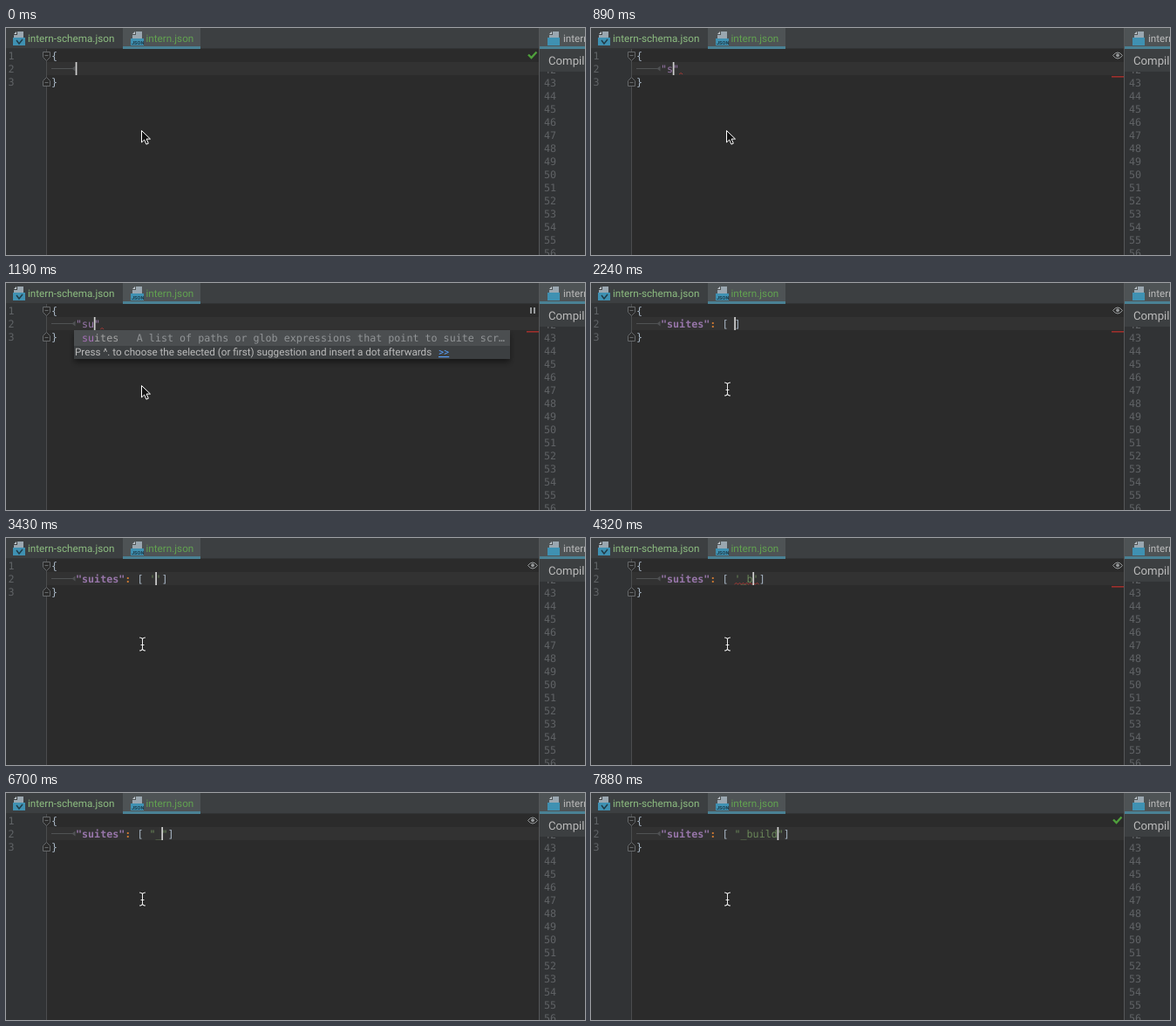
Write an HTML page that moves like this. It is 664 by 260 pixels and loops after 8000 ms.

```html
<!DOCTYPE html>
<html lang="en">
<head>
<meta charset="utf-8">
<title>Schema completion in an editor</title>
<style>
  html, body { margin: 0; width: 100%; height: 100%; overflow: hidden; background: #2b2b2b; }
  svg { display: block; width: 664px; height: 260px; }
  text { white-space: pre; text-rendering: geometricPrecision; }
  .mono { font: 11.7px "DejaVu Sans Mono", "Liberation Mono", monospace; }
  .ui { font: 11.7px Roboto, "Liberation Sans", sans-serif; fill: #bbb; }
  .num { fill: #606366; }
  .code { fill: #a9b7c6; }
  .key { fill: #9876aa; }
  .bold { font-weight: bold; }
  .colon { fill: #cc7832; font-weight: bold; }
  .str { fill: #6a8759; }
  .match { fill: #ffef28; font-weight: bold; }
  .name { fill: #a3a3a3; }
  .hit { fill: #a770b8; }
  .desc { fill: #606365; text-anchor: end; }
  .desc.on { fill: #919496; }
  .link { fill: #589df6; text-decoration: underline; }
  .off { display: none; }
</style>
</head>
<body>
<svg viewBox="0 0 664 260">
  <defs>
    <g id="page">
      <path d="M6 0h7v9H2V4h4z" fill="#9aa7b0"/>
      <path d="M5 0v3H2z" fill="#c3cbd0"/>
    </g>
    <clipPath id="rows"><rect x="78" y="54" width="500" height="81"/></clipPath>
    <filter id="shadow" x="-5%" y="-20%" width="110%" height="150%">
      <feDropShadow dx="0" dy="4" stdDeviation="3" flood-color="#000" flood-opacity=".45"/>
    </filter>
  </defs>

  <!-- Editor -->
  <rect width="664" height="260" fill="#2b2b2b"/>
  <rect y="24" width="46" height="236" fill="#313335"/>
  <rect x="47" y="39" width="564" height="15" fill="#323232"/>
  <path d="M46.5 24V260" stroke="#4b4d4e"/>
  <g fill="#2b2b2b" stroke="#66696b">
    <path d="M42.5 27.5h8v6l-4 4-4-4zM44.500 31.500h4"/>
    <path d="M42.500 66.500h8v-6l-4-4-4 4zM44.500 62.500h4"/>
  </g>
  <g class="mono num">
    <text x="2.500" y="36">1</text>
    <text x="2.500" y="51">2</text>
    <text x="2.500" y="66">3</text>
  </g>
  <path d="M52 46.500H76" stroke="#505254"/>
  <path d="M79.500 43.500v6l-4-3z" fill="#505254"/>
  <text class="mono code" x="52" y="36">{</text>
  <text class="mono code" x="52" y="66">}</text>

  <!-- Typed line -->
  <g id="marks" fill="#3b514d"></g>
  <text id="line" class="mono code" x="80" y="51"></text>
  <path id="wave" fill="none" stroke="#b03a36" stroke-width=".9"/>
  <rect id="caret" y="39" width="1.700" height="15" fill="#d0d0d0"/>

  <!-- Inspection status -->
  <rect id="stripe" x="597" y="55" width="14" height="1.600" fill="#9e2f2c"/>
  <g id="icons">
    <path id="ok" d="M599 30.500l3.500 3.500 6-6.500" fill="none" stroke="#4f9f3c" stroke-width="2.400"/>
    <g id="eye" fill="none" stroke="#989b9d">
      <path d="M598.500 31.500q5.500-7 11 0q-5.500 7-11 0z"/>
      <circle cx="604" cy="31.300" r="1.500" fill="#989b9d"/>
    </g>
    <path id="wait" d="M601 28h2v7h-2zM605 28h2v7h-2z" fill="#989b9d"/>
    <g id="bad">
      <circle cx="604" cy="31.500" r="4.800" fill="#b5403c"/>
      <path d="M604 28.500v3.500M604 33v1.500" stroke="#eee" stroke-width="1.300"/>
    </g>
  </g>

  <!-- Tabs -->
  <rect width="664" height="24" fill="#3c3f41"/>
  <path d="M0 23.500H611" stroke="#323435"/>
  <rect x="134" width="89" height="24" fill="#4e5355"/>
  <rect x="134" y="21" width="89" height="3" fill="#4a8194"/>
  <use href="#page" x="7" y="4"/>
  <rect x="8" y="11" width="14" height="9" fill="#3f91b2"/>
  <path d="M12 14l3 4 4-5" fill="none" stroke="#213c48" stroke-width="1.500"/>
  <text class="ui" x="25" y="16" style="fill:#8dbd80">intern-schema.json</text>
  <use href="#page" x="143" y="4"/>
  <rect x="143" y="12" width="15" height="8" fill="#3f91b2"/>
  <text class="ui" x="144" y="18.500" style="fill:#1d3a48;font-size:5.600px;font-weight:bold">JSON</text>
  <text class="ui" x="160.500" y="16" style="fill:#62a250">intern.json</text>

  <!-- Right pane -->
  <rect x="612" y="24" width="52" height="236" fill="#313335"/>
  <g id="numbers" class="mono num"></g>
  <rect x="612" width="52" height="24" fill="#4e5355"/>
  <rect x="612" y="21" width="52" height="3" fill="#4a8194"/>
  <use href="#page" x="621" y="4"/>
  <rect x="621" y="11" width="14" height="9" fill="#3f91b2"/>
  <text class="ui" x="639" y="16">intern</text>
  <rect x="612" y="24" width="52" height="26" fill="#3c3f41"/>
  <text class="ui" x="622" y="42" style="font-size:13.200px">Compil</text>
  <path d="M611.500 0V260" stroke="#555759"/>

  <g id="popups"></g>

  <!-- Pointers -->
  <path id="arrow" d="M155.500 117.500v13.500l3.200-3 2.200 5.200 2.400-1-2.200-5.100h4.400z" fill="#111" stroke="#fff"/>
  <g id="beam" fill="none">
    <path d="M153 114q3.500 0 3.500 2.500v10q0 2.500-3.500 2.500M160 114q-3.500 0-3.500 2.500v10q0 2.500 3.500 2.500M154.500 122.500h4" stroke="#111" stroke-width="2.600"/>
    <path d="M153 114q3.500 0 3.500 2.500v10q0 2.500-3.500 2.500M160 114q-3.500 0-3.500 2.500v10q0 2.500 3.500 2.500M154.500 122.500h4" stroke="#eee" stroke-width="1.200"/>
  </g>
</svg>

<script>
const LOOP = 8000, LEFT = 80, CELL = 7.044;
const $ = id => document.getElementById(id);
const show = (el, on) => el.classList.toggle("off", !on);
const span = (cls, s) => `<tspan class="${cls}">${s}</tspan>`;
const text = (cls, x, y, s) => `<text class="${cls}" x="${x}" y="${y}">${s}</text>`;
const rect = (x, y, w, h, fill) => `<rect x="${x}" y="${y}" width="${w}" height="${h}" fill="${fill}"/>`;

// Time, typed line ("|" is the caret), status icon, then flags:
// r error stripe, w wave under the value, k wave after the key,
// h bracket highlight, L long popup, S short popup
const list = value => `"suites": [${value}]`;
const steps = [
  [0, "|", "ok", ""],
  [150, "", "ok", ""],
  [590, '"|"', "eye", ""],
  [890, '"s|"', "eye", "rk"],
  [1040, '"s|"', "eye", "rkL"],
  [1190, '"su|"', "wait", "rkS"],
  [2090, list("|"), "eye", "r"],
  [2240, list(" |"), "eye", "r"],
  [2540, list(' "|"'), "eye", "r"],
  [2690, list(' "|"'), "ok", ""],
  [3130, list(" |"), "eye", "h"],
  [3430, list(" '|'"), "eye", ""],
  [3730, list(" '|'"), "bad", "rw"],
  [4030, list(" '_|'"), "eye", "rw"],
  [4320, list(" '_b|'"), "eye", "rw"],
  [4470, list(" '_b|'"), "bad", "rw"],
  [4620, list(" '_bu|'"), "eye", "rw"],
  [4770, list(" '_bui|'"), "eye", "rw"],
  [4920, list(" '_buil|'"), "eye", "rw"],
  [5210, list(" '_bui|'"), "eye", "rw"],
  [5360, list(" '_bu|'"), "eye", "rw"],
  [5510, list(" '_b|'"), "eye", "rw"],
  [5660, list(" '_|'"), "eye", "rw"],
  [5810, list(" '|'"), "eye", "rw"],
  [5960, list(" |"), "eye", "rh"],
  [6250, list(' "|"'), "eye", "r"],
  [6400, list(' "|"'), "ok", ""],
  [6700, list(' "_|"'), "eye", ""],
  [6990, list(' "_b|"'), "eye", ""],
  [7140, list(' "_b|"'), "ok", ""],
  [7290, list(' "_bu|"'), "eye", ""],
  [7440, list(' "_bui|"'), "eye", ""],
  [7590, list(' "_buil|"'), "eye", ""],
  [7730, list(' "_build|"'), "eye", ""],
  [7880, list(' "_build|"'), "ok", ""]
];

const options = [
  ["suites", "A list of paths or glob expressions that point to suite scr…"],
  ["scripts", "A list of scripts to load before any external loader is co…"],
  ["sessionId", "An identifier for this test session"],
  ["showConfig", "display the resolved config and exit"],
  ["filterErrorStack", "filter external library calls and runtime calls o…"]
];

function popup(id, rows, hit, hintTop) {
  const body = rows.map(([name, desc], i) => {
    const y = 67 + i * 18;
    return text("mono name", 87, y, name.replace(hit, m => span("hit", m))) +
      text("mono desc" + (i ? "" : " on"), 572, y, desc);
  }).join("");
  const y = hintTop + 11;
  return `<g id="${id}"><g filter="url(#shadow)">` +
    rect(78, 54, 500, hintTop - 39, "#3b3e40") + "</g>" +
    rect(78, 54, 500, 18, "#4b4e50") +
    `<g clip-path="url(#rows)">${body}</g>` +
    rect(78, hintTop, 500, 15, "#3c3f41") +
    text("ui", 79, y, "Press ^. to choose the selected (or first) suggestion and insert a dot afterwards") +
    text("ui link", 496, y, "&gt;&gt;") +
    (rows.length > 1 ? `<text class="ui" x="566" y="${y}" style="fill:#589df6;font-size:13px">π</text>` : "") +
    "</g>";
}

$("popups").innerHTML =
  popup("long", options, /^s|S/, 135) + popup("short", options.slice(0, 1), /^su/, 72);
$("numbers").innerHTML = Array.from({ length: 15 }, (_, i) =>
  text("", 617, 52 + i * 15, 42 + i)).join("");

function paint(line, flags) {
  const bracket = flags.includes("h") ? "match" : "code";
  return line.replace(/"suites"|["'][^"']*["']|[:[\]]/g, (m, at) => {
    if (m === ":") return span("colon", m);
    if (/[[\]]/.test(m)) return span(bracket, m);
    return span(at ? "str" : m === '"suites"' ? "key bold" : "key", m);
  });
}

function wave(from, to) {
  let d = `M${from} 53`;
  for (let x = from + 2, up = true; x <= to; x += 2, up = !up) d += `L${x} ${up ? 51.5 : 53}`;
  return d;
}

function draw([time, typed, icon, flags]) {
  const col = typed.indexOf("|"), line = typed.replace("|", "");
  const at = i => LEFT + i * CELL;
  const has = f => flags.includes(f);

  $("line").innerHTML = paint(line, flags);
  $("marks").innerHTML = has("h") ? ["[", "]"].map(c =>
    `<rect x="${at(line.indexOf(c))}" y="39" width="${CELL}" height="15"/>`).join("") : "";
  show($("caret"), col >= 0);
  $("caret").setAttribute("x", at(col) - 0.3);

  const end = at(line.length);
  $("wave").setAttribute("d", has("w") ? wave(at(12), end - CELL) : has("k") ? wave(end, end + 5) : "");
  show($("stripe"), has("r"));
  for (const el of $("icons").children) show(el, el.id === icon);
  show($("long"), has("L"));
  show($("short"), has("S"));
  show($("arrow"), time < 2090);
  show($("beam"), time >= 2090);
}

let current;
function tick() {
  const t = performance.now() % LOOP;
  const step = steps.findLast(s => s[0] <= t);
  if (step !== current) draw(current = step);
  requestAnimationFrame(tick);
}
tick();
</script>
</body>
</html>
```
